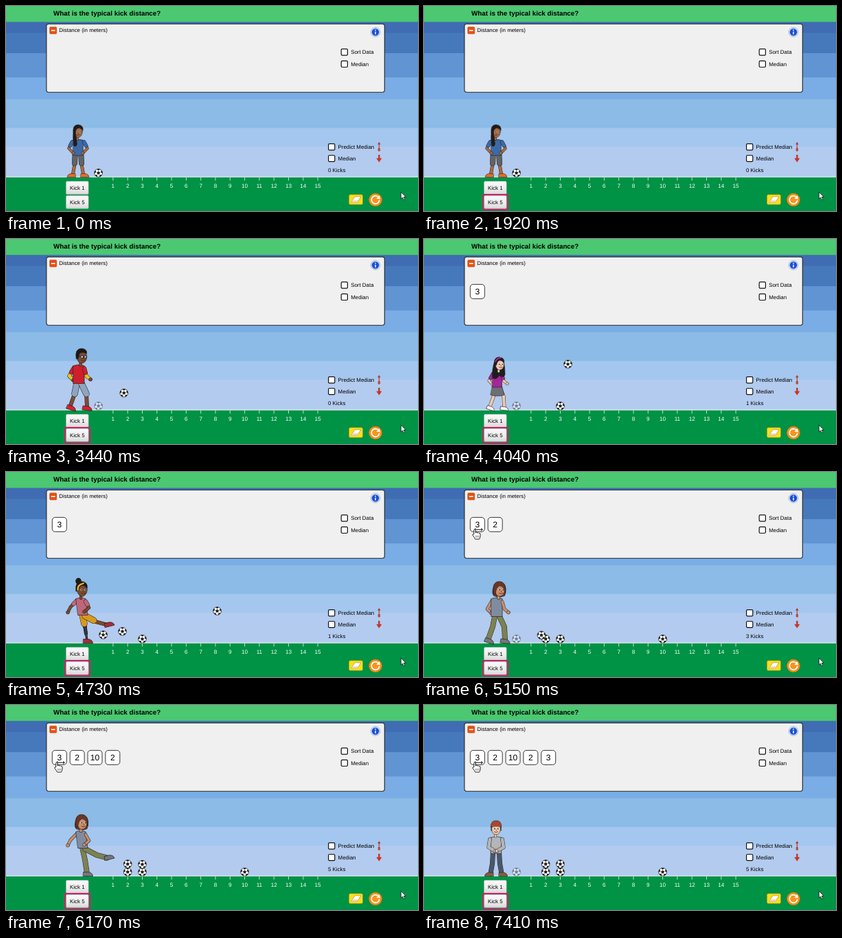
Animation of 600x300 px, one loop 8 s. Source, as an HTML page:

```html
<!DOCTYPE html>
<html lang="en">
<head>
<meta charset="utf-8">
<title>Kick distance</title>
<style>
  html, body { margin: 0; width: 100%; height: 100%; overflow: hidden; background: #009245; }
  svg { display: block; width: 600px; height: 300px; }
  text { font: 7.9px "Liberation Sans", Arial, sans-serif; text-rendering: geometricPrecision; }
  .title { font-size: 9.8px; font-weight: bold; }
  .mid { text-anchor: middle; }
  .tick text { font-size: 8.2px; fill: #fff; }
  .card text { font-size: 12px; }
  .person path, .person circle, .person ellipse { stroke-linecap: round; stroke-linejoin: round; }
</style>
</head>
<body>
<svg id="stage" viewBox="0 0 600 300">
  <defs>
    <clipPath id="disc"><circle r="5.9"/></clipPath>
    <g id="ball"></g>
    <linearGradient id="btn" x2="0" y2="1">
      <stop offset="0" stop-color="#fafafa"/><stop offset=".6" stop-color="#ededed"/><stop offset="1" stop-color="#d8d8d8"/>
    </linearGradient>
  </defs>
  <g id="sky"></g>
  <rect y="249.4" width="600" height="2" fill="#dbe7f0"/>
  <rect y="250.8" width="600" height="50" fill="#009245"/>
  <rect width="600" height="23.3" fill="#4bc871"/>
  <text class="title" x="69" y="14.4">What is the typical kick distance?</text>

  <rect x="58.9" y="26.2" width="492.4" height="100" rx="3.4" fill="#f0f0f0" stroke="#222" stroke-width="1.1"/>
  <rect x="63.7" y="30.8" width="10" height="10" rx="1.2" fill="#ea4f12" stroke="#a33a10" stroke-width=".5"/>
  <path d="M65.8 35.8H71.6" stroke="#fff" stroke-width="1.6"/>
  <text x="77.3" y="38.4">Distance (in meters)</text>
  <circle cx="538" cy="38.2" r="6.8" fill="#dfe7f5" stroke="#8fa9d8" stroke-width=".8"/>
  <circle cx="538" cy="38.2" r="5.3" fill="#1b50cf"/>
  <path d="M538 37.4V41.4" stroke="#fff" stroke-width="1.5"/>
  <circle cx="538" cy="35.4" r=".9" fill="#fff"/>

  <g id="checks"></g>
  <path d="M543.3 201V209.6M541.6 202.8L543.3 200L545 202.8M541.8 208.4L543.3 210.2L544.8 208.4" fill="none" stroke="#b83420" stroke-width="1.1"/>
  <circle cx="543.3" cy="211" r="1.4" fill="#d8604a" stroke="#8f2c1c" stroke-width=".6"/>
  <path d="M542.4 218V223H539.8L543.3 228.2L546.8 223H544.2V218Z" fill="#d8301d" stroke="#a82a18" stroke-width=".5"/>
  <text id="count" x="469" y="243"></text>
  <g id="ticks"></g>

  <g id="buttons"></g>
  <rect id="focus" x="86.2" width="36" height="22" rx="1" fill="none" stroke="#cf1f6d" stroke-width="2"/>

  <rect x="499.5" y="276" width="20" height="14.6" rx="2" fill="#f8e01c" stroke="#b79408" stroke-width=".7"/>
  <path d="M502.4 287.6L508 279H517L511.4 287.6Z" fill="#fff" stroke="#9c8430" stroke-width=".6"/>
  <path d="M502.4 287.6L504.4 284.6H513.4L511.4 287.6Z" fill="#f1cfc0"/>
  <circle cx="538" cy="283.6" r="9.4" fill="#f7941e" stroke="#d27410" stroke-width=".8"/>
  <path d="M541.8 279.2A5.8 5.8 0 1 0 543.8 284.2" fill="none" stroke="#fff" stroke-width="1.7"/>
  <path d="M539.4 282L545 282.6L543.6 277Z" fill="#fff"/>

  <g id="people"></g>
  <use id="tee" href="#ball" x="134.6" y="244.3"/>
  <g id="balls"></g>
  <g id="cards"></g>
  <g id="hand">
    <path d="M73.4 84.3H85M75.6 82.4L73.2 84.3L75.6 86.2M83 82.4L85.4 84.3L83 86.2" fill="none" stroke="#111" stroke-width="1"/>
    <path d="M72.7 91V84.7Q73.8 82.8 75 84.7V88.8Q76.6 87.4 77.6 89Q79.2 87.9 80 89.6Q82 89 82 91V94Q81.6 96.4 80.6 98.2H74.6Q73.4 95.6 70.8 92.4Q70.6 90.4 72.7 91Z" fill="#fff" stroke="#111" stroke-width=".9" stroke-linejoin="round"/>
    <path d="M75.6 93V96M77.6 93V96M79.6 93V96" stroke="#111" stroke-width=".5"/>
  </g>
  <path d="M575.2 272.2V282.2L577.5 280.2L579.2 283.8L580.9 283L579.2 279.6H582.2Z" fill="#fff" stroke="#111" stroke-width=".8"/>
</svg>
<script>
const LOOP = 8000, X0 = 134.6, METER = 21.3, GROUND = 244.3, LEAD = 75, RESET = 6430;
const $ = id => document.getElementById(id);
const fill = (id, html) => { $(id).innerHTML = html; };
const show = (el, on) => el.setAttribute('visibility', on ? 'visible' : 'hidden');
const clamp = v => Math.max(0, Math.min(1, v));

// Scenery and controls
const bands = [[23, '#3f6cb2'], [39.5, '#4678bc'], [69, '#6094d3'], [104.5, '#7aade5'], [136.5, '#8bbbe6'], [178.5, '#a4c7ef'], [206, '#b3cbef']];
fill('sky', bands.map(([y, c]) => `<rect y="${y}" width="600" height="${250 - y}" fill="${c}"/>`).join(''));

const check = (x, y, label) =>
  `<rect x="${x}" y="${y}" width="9.2" height="9.2" rx="1.4" fill="#fff" stroke="#111" stroke-width="1.2"/>
   <text x="${x + 14}" y="${y + 7.4}">${label}</text>`;
fill('checks', check(488.2, 62.9, 'Sort Data') + check(488.2, 80.3, 'Median') +
  check(469.6, 201.7, 'Predict Median') + check(469.6, 218.5, 'Median'));

fill('ticks', Array.from({ length: 15 }, (_, i) => {
  const x = X0 + METER * (i + 1);
  return `<g class="tick"><path d="M${x} 250.5V255.5" stroke="#d5ecdd" stroke-width=".9"/><text class="mid" x="${x}" y="265.7">${i + 1}</text></g>`;
}).join(''));

fill('buttons', [[1, 256.6], [5, 277.4]].map(([n, y]) =>
  `<rect x="87.5" y="${y}" width="32.6" height="19" rx="1.5" fill="url(#btn)" stroke="#b5b5b5" stroke-width=".6"/>
   <text class="mid" x="103.8" y="${y + 12.4}">Kick ${n}</text>`).join(''));

const ring = (r, n, turn) => Array.from({ length: n }, (_, i) => {
  const a = turn + i * 2 * Math.PI / n;
  return [r * Math.cos(a), r * Math.sin(a)];
});
const UP = -Math.PI / 2;
const poly = pts => 'M' + pts.map(p => p.map(v => +v.toFixed(2)).join(' ')).join('L');
fill('ball', `<circle r="5.9" fill="#fff"/><g clip-path="url(#disc)">
  <path d="${poly(ring(2.4, 5, UP))}Z"/>
  ${ring(5.8, 5, UP).map(([x, y]) => `<circle cx="${x}" cy="${y}" r="1.9"/><path d="M0 0L${x} ${y}" stroke="#555" stroke-width=".5"/>`).join('')}
  </g><circle r="5.9" fill="none" stroke="#222" stroke-width=".8"/>`);

// Kickers: joints relative to the ground point, in a common body size
const poses = {
  stand: {
    x: 105, face: 0, head: [0, -77], top: [0, -63], hip: [0, -39], wide: 8.5,
    arms: [[[-10, -60], [-16, -49], [-8, -41]], [[10, -60], [16, -49], [8, -41]]],
    legs: [[[-5, -39], [-6, -21], [-9, -4]], [[5, -39], [6, -21], [9, -4]]],
    shoes: [[-9, -3, -1, 0], [9, -3, 1, 0]]
  },
  clasp: {
    arms: [[[-10, -60], [-12, -47], [-2, -41]], [[10, -60], [12, -47], [1, -41]]],
  },
  poised: {
    x: 110, face: 3, head: [-.5, -78], top: [-4, -65], hip: [-4, -41], wide: 8,
    arms: [[[-11, -62], [-18, -50], [-12, -44]], [[4, -61], [7, -50], [13, -45]]],
    legs: [[[-7, -39], [-10, -24], [-16, -7]], [[0, -39], [7, -24], [8, -5]]],
    shoes: [[-17, -4, 1, 18], [6, -3, 1, 6]]
  },
  kick: {
    x: 110, face: 3, head: [0, -78], top: [-1, -65], hip: [2, -43], wide: 7,
    arms: [[[-7, -62], [-16, -53], [-20, -45]], [[6, -61], [11, -52], [4, -46]]],
    legs: [[[1, -42], [5, -24], [8, -4]], [[5, -40], [22, -31], [37, -27]]],
    shoes: [[7, -3, 1, 0], [38, -27, 1, -14]]
  }
};
poses.clasp = { ...poses.stand, ...poses.clasp };

const shape = (d, c) => `<path d="${d}" fill="${c}" stroke="#222" stroke-width=".7"/>`;
const line = (d, c, w) => `<path d="${d}" fill="none" stroke="${c}" stroke-width="${w}"/>`;
const limb = (pts, w, c) => line(poly(pts), '#222', w + 1) + line(poly(pts), c, w);
const mix = (a, b, k) => a.map((v, i) => v + (b[i] - v) * k);
const cap = 'M-9 2Q-11-13 0-13Q11-12 9-2Q6-7 1-7Q-4-6-5 1Z';

const people = [
  { s: .86, skin: '#a66c42', hair: '#221b1a', shirt: '#3e69a8', sleeve: .6, pants: '#626466', shorts: .85, shoe: '#ea6a28',
    hairTop: c => shape(cap, c) + shape('M-8-5Q-11 8-8 25Q-4 28-2 22Q-3 12-5 0Z', c) },
  { s: 1, skin: '#7d4c35', hair: '#1d1715', shirt: '#cf1f2c', sleeve: .55, under: '#f0bf1e', pants: '#8fa4be', shorts: 1, shoe: '#d6202d',
    hairTop: c => shape('M-8 3Q-11-13 1-13Q10-12 9-5Q4-8-2-6Q-4-3-5 3Z', c) +
      '<g fill="#fff" fill-opacity=".6" stroke="#111" stroke-width="1"><circle cx="1.4" cy="0" r="2.3"/><circle cx="6.8" cy="0" r="2.1"/></g>' + line('M-1-.4L-6-1', '#111', .9) },
  { s: .86, skin: '#f0c9ae', hair: '#211c20', shirt: '#a3269c', sleeve: .6, pants: '#6e6f72', skirt: 1, shoe: '#f4f4f4',
    hairBack: c => shape('M-8-8Q-15 10-12 25Q-5 28 0 20Q8 26 11 18Q11 4 8-7Z', c),
    hairTop: c => shape(cap, c) + line('M-7-5Q-5-11 4-12', '#b32bab', 2.2) },
  { s: 1, skin: '#7b4a2e', hair: '#211814', shirt: '#c0667b', sleeve: .5, pants: '#d79a1e', shorts: .75, shoe: '#a82c36', blade: 1,
    hairBack: c => `<circle cx="-5" cy="-13.5" r="4.8" fill="${c}"/>`,
    hairTop: c => shape(cap, c) + line('M-6 0Q-7-8 3-10', '#eebb27', 2.4) },
  { s: 1, skin: '#c98d6b', hair: '#6b3626', shirt: '#7f8ca0', sleeve: 0, pants: '#7c8250', shoe: '#77767c',
    hairBack: c => shape('M-8-8Q-13 4-9 9Q0 13 9 9Q13-3 8-9Z', c),
    hairTop: c => shape('M-9 6Q-12-13 0-13Q12-13 10 5L7-3Q3-7 0-6Q-5-4-6 6Z', c) },
  { s: .9, skin: '#efc5a5', hair: '#7a4528', shirt: '#b3b5b9', sleeve: 2, pants: '#4b5669', shoe: '#8b5a3c',
    hairBack: c => shape('M-9-4V3H9V-4Z', c),
    hairTop: () => shape('M-9.5-3Q-10-14 0-14Q10-14 9.5-3Q0-6-9.5-3Z', '#a9472f') }
];

function arm(p, a) {
  const [s, e, h] = a;
  const sleeve = p.sleeve > 1 ? limb(a, 5.2, p.shirt) : p.sleeve ? limb([s, mix(s, e, p.sleeve)], 5.4, p.shirt) : '';
  return limb(a, p.under ? 4.4 : 3.6, p.under || p.skin) + sleeve +
    `<circle cx="${h[0]}" cy="${h[1]}" r="2.5" fill="${p.skin}" stroke="#222" stroke-width=".5"/>`;
}

function leg(p, l, [x, y, dir, turn], blade) {
  const [hip, knee, foot] = l;
  const long = !p.shorts && !p.skirt;
  return limb(blade ? [hip, knee] : l, long ? 6.8 : 4.8, long ? p.pants : p.skin) +
    (blade ? limb([knee, mix(knee, foot, .5)], 4.2, '#353b4a') + limb([knee, foot], 2.4, '#353b4a') : '') +
    (p.shorts ? limb([hip, mix(hip, knee, p.shorts)], 8.4, p.pants) : '') +
    `<g transform="translate(${x} ${y}) rotate(${turn}) scale(${dir} 1)">${shape('M-4-3H3Q9-2 9.5 3H-4.5Z', p.shoe)}</g>`;
}

function head(p, pose) {
  const f = pose.face, c = p.hair;
  return `<g transform="translate(${pose.head}) scale(.9 .95)">${p.hairBack ? p.hairBack(c) : ''}
    ${limb([[-1, 8], [-1, 13]], 3.6, p.skin)}
    <ellipse cx="${f / 3}" cy="0" rx="8" ry="10" fill="${p.skin}" stroke="#222" stroke-width=".7"/>
    <g fill="#fff"><ellipse cx="${f - 3}" cy="0" rx="1.6" ry="1.4"/><ellipse cx="${f + 3}" cy="0" rx="1.6" ry="1.4"/></g>
    <circle cx="${f - 2.7}" cy="0" r="1"/><circle cx="${f + 3.2}" cy="0" r="1"/>
    ${line(`M${f} 1L${f + 1} 3.2H${f}`, '#553322', .6)}${line(`M${f - 3} 5.2Q${f} 7.6 ${f + 3} 5`, '#5a2018', .9)}
    ${p.hairTop(c)}</g>`;
}

function draw(p, name) {
  const q = poses[name], [tx, ty] = q.top, [hx, hy] = q.hip, w = q.wide;
  const torso = shape(`M${tx - w} ${ty}Q${tx} ${ty - 3} ${tx + w} ${ty}L${hx + w} ${hy + 2}H${hx - w}Z`, p.shirt);
  const skirt = p.skirt ? shape(`M${hx - 8} ${hy}H${hx + 8}L${hx + 12} ${hy + 15}Q${hx} ${hy + 19} ${hx - 11} ${hy + 15}Z`, p.pants) : '';
  const backLeg = leg(p, q.legs[0], q.shoes[0], p.blade && name === 'kick');
  const frontLeg = leg(p, q.legs[1], q.shoes[1]);
  const front = name === 'stand' || name === 'clasp';
  return `<g class="person" visibility="hidden" transform="translate(${q.x} 250.5) scale(${p.s})">` +
    (front ? '' : arm(p, q.arms[0])) + backLeg + frontLeg + skirt + torso +
    (front ? arm(p, q.arms[0]) : '') + arm(p, q.arms[1]) + head(p, q) + '</g>';
}

// Kicks: distance, launch time and peak height decide everything else
const kicks = [
  { d: 3, at: 2970, h: 19.5 },
  { d: 10, at: 3513, h: 67 },
  { d: 2, at: 4083, h: 18.6 },
  { d: 2, at: 4632, h: 11, level: 1 },
  { d: 3, at: 5187, h: 25, level: 1 }
];
for (const k of kicks) {
  k.span = 1500 * Math.sqrt(k.h / 67);
  k.land = k.at + k.span;
  k.card = k.land + (k.level ? 327 : 250);
}
const landed = [...kicks].sort((a, b) => a.land - b.land);

// Each pose with the moment it begins
const acts = [{ from: 0, who: 0, pose: 'stand' }];
kicks.forEach((k, i) => acts.push({ from: k.at - LEAD, who: i, pose: 'poised' }, { from: k.at, who: i, pose: 'kick' }));
acts.push({ from: RESET, who: 5, pose: 'clasp' });
fill('people', acts.map(a => draw(people[a.who], a.pose)).join(''));
acts.forEach((a, i) => { a.el = $('people').children[i]; });

fill('balls', kicks.map(() => '<use href="#ball"/>').join(''));
kicks.forEach((k, i) => { k.el = $('balls').children[i]; });

fill('cards', landed.map((k, i) => {
  const x = 77.8 + 25.85 * i;
  return `<g class="card"><rect x="${x - 10.5}" y="66.4" width="21" height="21" rx="4.2" fill="#fff" stroke="#222" stroke-width=".9"/><text class="mid" x="${x}" y="81.2">${k.d}</text></g>`;
}).join(''));
const cards = [...$('cards').children];

function render(t) {
  const act = acts.filter(a => t >= a.from).pop();
  for (const a of acts) show(a.el, a === act);
  show($('tee'), act.pose !== 'kick');
  $('tee').setAttribute('opacity', act.who ? .45 : 1);

  for (const k of kicks) {
    const u = clamp((t - k.at) / k.span);
    const lift = k.level ? 11.6 * clamp((t - k.land - 20) / 50) : 0;
    k.el.setAttribute('x', X0 + METER * k.d * u);
    k.el.setAttribute('y', GROUND - 4 * k.h * u * (1 - u) - lift);
    show(k.el, t >= k.at);
  }

  const shown = landed.filter(k => t >= k.card).length;
  cards.forEach((c, i) => show(c, i < shown));
  show($('hand'), shown > 1);
  $('count').textContent = landed.filter(k => t >= k.land + 37).length + ' Kicks';

  $('focus').setAttribute('y', t < 1230 ? 255 : 276);
  show($('focus'), t >= 420);
}

const start = performance.now();
function tick() {
  render((performance.now() - start) % LOOP);
  requestAnimationFrame(tick);
}
tick();
</script>
</body>
</html>
```
